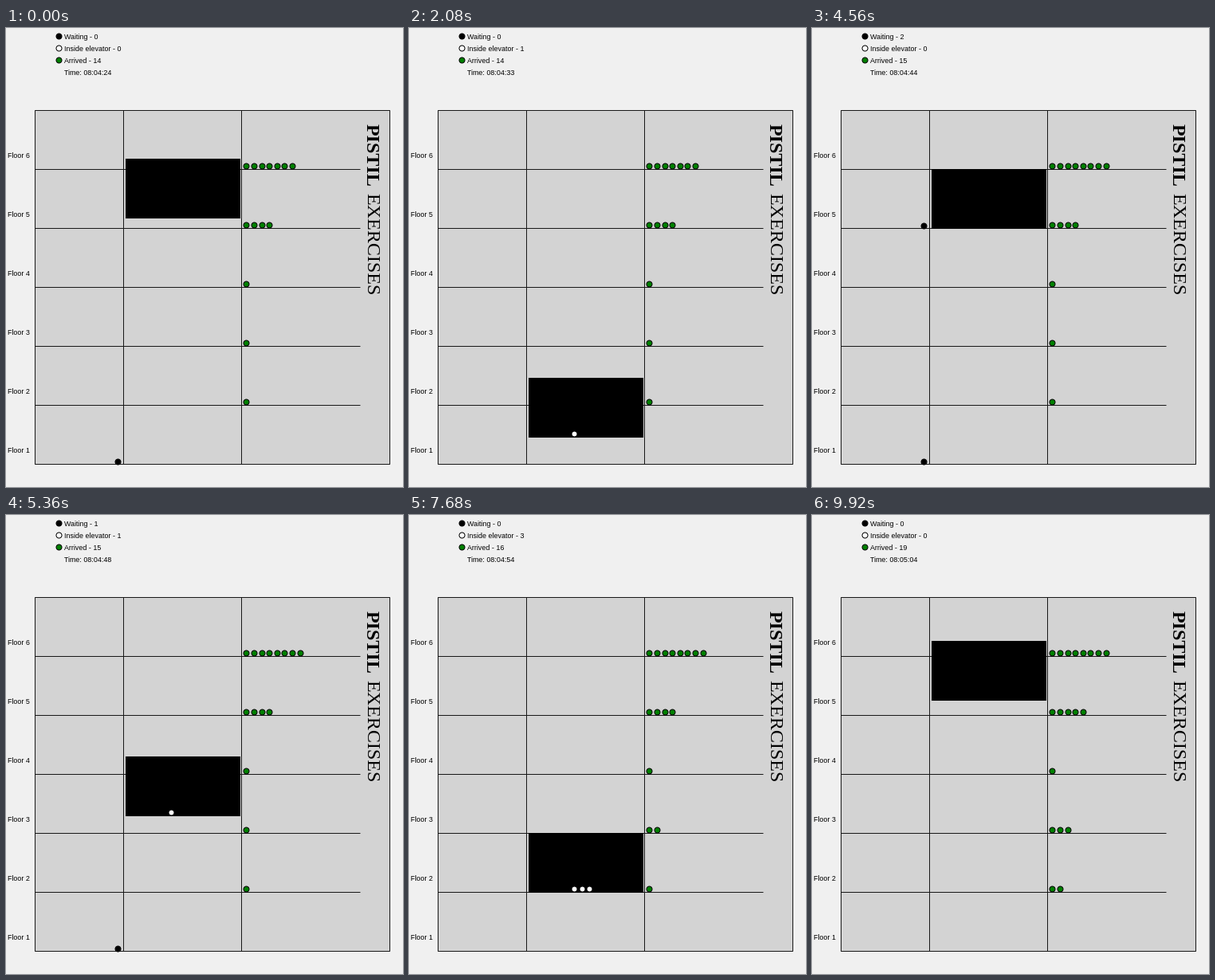
These frames come from a looping animation (498 px wide and 576 px high, 10 s). A matplotlib script:

```python
import math
import numpy as np
import matplotlib.pyplot as plt
from matplotlib.animation import FuncAnimation
from matplotlib.patches import Rectangle

W, H, DPI = 498, 576, 100
FRAMES, INTERVAL = 125, 80
PX = 72 / DPI                   # points per pixel
INK = "#181818"
GROUND, STOREY, TOP = 547, 74.05, 6
GAP = 9.6                       # spacing of people in a row

# Durations in frames
TRAVEL, BOARD, LEAVE = 4.97, 3, 2
START_FLOOR = 5.17
SECONDS_PER_FLOOR = 2
START_TIME = 8 * 3600 + 4 * 60 + 24.35

ARRIVED_BEFORE = [0, 1, 1, 1, 4, 7]
CALLS = [(0, 1, 6), (33, 1, 2), (48, 5, 3), (70, 1, 5), (82, 1, 3)]


class Person:
    def __init__(self, spawn, origin, target):
        self.spawn, self.origin, self.target = spawn, origin, target
        self.boarded = self.left = math.inf
        self.slot = 0

    def waits(self, t):
        return self.spawn <= t < self.boarded

    def rides(self, t):
        return self.boarded <= t < self.left


def simulate(people):
    """Sweep up and down, stopping wherever somebody gets on or off."""
    t, floor, step = 0, START_FLOOR, -1
    path, stops = [(t, floor)], []
    while t < FRAMES:
        target = math.ceil(floor) + step
        t += TRAVEL * abs(target - floor)
        floor = target
        path.append((t, floor))
        arrive = t
        for p in people:
            if p.rides(t) and p.target == floor:
                t += LEAVE
                p.left = t
        for p in people:
            if p.waits(t) and p.origin == floor:
                t += BOARD
                taken = {q.slot for q in people if q.rides(t)}
                p.slot = next(s for s in range(len(people)) if s not in taken)
                p.boarded = t
        if t > arrive:
            stops.append((arrive, t))
            path.append((t, floor))
        if floor in (1, TOP):
            step = -step
    return path, stops


people = [Person(*call) for call in CALLS]
path, stops = simulate(people)
times, floors = np.array(path).T
travelled = np.concatenate([[0], np.cumsum(np.abs(np.diff(floors)))])


def floor_y(floor):
    return GROUND - STOREY * (floor - 1)


def clock(frame):
    moved = np.interp(frame, times, travelled)
    total = int(START_TIME + SECONDS_PER_FLOOR * moved)
    return f"Time: {total // 3600:02d}:{total // 60 % 60:02d}:{total % 60:02d}"


def waiting_count(frame):
    """The counter is only refreshed while the elevator stands at a floor."""
    seen = [min(frame, leave) for arrive, leave in stops if arrive <= frame]
    return sum(p.waits(seen[-1]) for p in people) if seen else 0


fig = plt.figure(figsize=(W / DPI, H / DPI), dpi=DPI, facecolor="#f0f0f0")
ax = fig.add_axes([0, 0, 1, 1])
ax.set_xlim(0, W)
ax.set_ylim(H, 0)
ax.axis("off")


def line(xs, ys):
    ax.plot(xs, ys, color=INK, lw=PX, zorder=2, solid_capstyle="butt")


def dots(color, points=()):
    xy = np.array(points, dtype=float).reshape(-1, 2)
    return ax.scatter(xy[:, 0], xy[:, 1], s=(7 * PX) ** 2, c=color,
                      edgecolors="black", linewidths=PX, zorder=5)


def place(collection, points):
    collection.set_offsets(np.array(points, dtype=float).reshape(-1, 2))


def label(x, y, text=""):
    return ax.text(x, y, text, fontsize=8.9 * PX, family="Liberation Sans",
                   va="baseline", zorder=6)


def title(y, text, weight):
    ax.text(452, y, text, fontsize=24 * PX, family="Liberation Serif",
            weight=weight, rotation=270, rotation_mode="anchor",
            ha="left", va="baseline", zorder=6)


# Building
ax.add_patch(Rectangle((36, 103), 445, 444, facecolor="#d3d3d3",
                       edgecolor=INK, lw=PX, zorder=1))
for x in (147, 295):
    line([x, x], [103, GROUND])
for n in range(1, TOP + 1):
    y = round(floor_y(n))
    if n > 1:
        line([36, 444], [y, y])
    label(2.5, y - 14, f"Floor {n}")
title(119.5, "PISTIL", "bold")
title(207, "EXERCISES", "normal")

# Legend
for i, color in enumerate(("black", "white", "green")):
    dots(color, [(65.7, 10.4 + 14.8 * i)])
legend = [label(73, 14 + 15 * i) for i in range(4)]

# Moving parts
cabin = ax.add_patch(Rectangle((150, 0), 144, 75, facecolor="black",
                               lw=0, zorder=3))
waiting_dots, inside_dots, arrived_dots = map(dots, ("black", "white", "green"))


def update(frame):
    bottom = round(floor_y(np.interp(frame, times, floors)))
    cabin.set_y(bottom - 74)

    waiting, arrived = [], []
    for n, before in enumerate(ARRIVED_BEFORE, 1):
        queue = sum(p.waits(frame) and p.origin == n for p in people)
        done = before + sum(p.left <= frame and p.target == n for p in people)
        y = floor_y(n)
        waiting += [(140 - GAP * k, y - 3.3) for k in range(queue)]
        arrived += [(301.4 + GAP * k, y - 4) for k in range(done)]
    inside = [(207 + GAP * p.slot, bottom - 4)
              for p in people if p.rides(frame)]

    place(waiting_dots, waiting)
    place(inside_dots, inside)
    place(arrived_dots, arrived)

    texts = (f"Waiting - {waiting_count(frame)}",
             f"Inside elevator - {len(inside)}",
             f"Arrived - {len(arrived)}",
             clock(frame))
    for artist, text in zip(legend, texts):
        artist.set_text(text)
    return [cabin, waiting_dots, inside_dots, arrived_dots, *legend]


anim = FuncAnimation(fig, update, frames=FRAMES, interval=INTERVAL,
                     repeat=True, repeat_delay=0)
plt.show()
```
